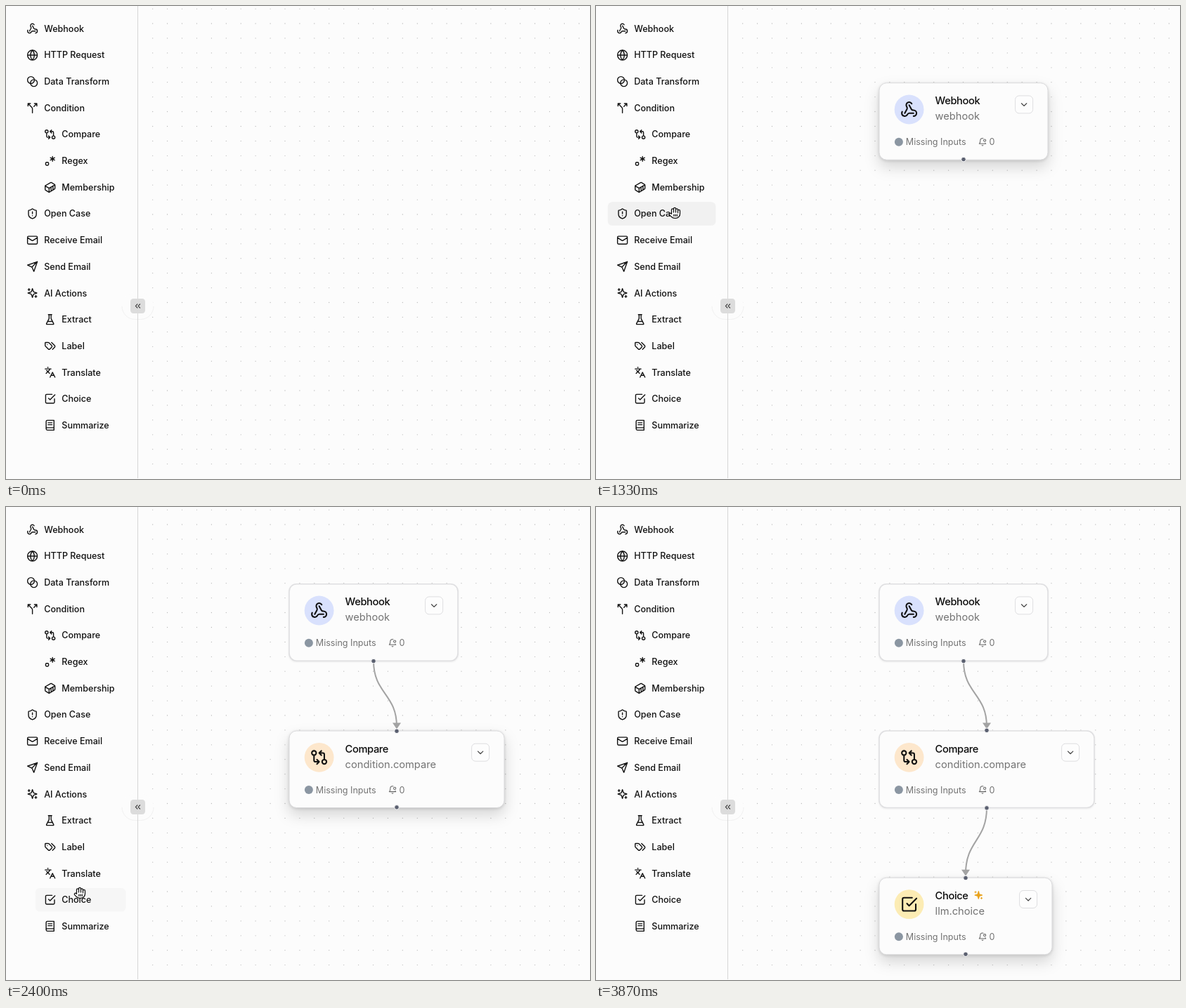
Recreate the animation shown at these times as an HTML page. Size 831 by 674 pixels, loop 3940 ms.

```html
<!DOCTYPE html>
<html lang="en">
<head>
<meta charset="utf-8">
<title>Workflow builder</title>
<style>
  html, body { margin: 0; width: 100%; height: 100%; overflow: hidden; background: #fcfcfc; }
  svg { display: block; }
  #stage { width: 831px; height: 674px; font-family: Inter, sans-serif; }
  .icon { fill: none; stroke: #111; stroke-width: 2; stroke-linecap: round; stroke-linejoin: round; }
  .row { font-size: 12.55px; font-weight: 500; fill: #111; }
  .title { font-size: 14.65px; font-weight: 500; letter-spacing: -.025em; fill: #0c0c0c; }
  .sub { font-size: 14.65px; fill: #737373; }
  .meta { font-size: 12.55px; fill: #737373; }
  .card { fill: #fcfcfc; stroke: #dfdfe1; stroke-width: 1.6; filter: drop-shadow(0 1px 1px rgba(0,0,0,.07)); }
  .active .card { stroke: #d9d9db; stroke-width: 1;
    filter: drop-shadow(0 1px 2px rgba(0,0,0,.14)) drop-shadow(0 10px 10px rgba(0,0,0,.15)); }
  .chip rect { filter: drop-shadow(0 2px 6px rgba(0,0,0,.22)); }
  .edge { fill: none; stroke: #a3a3a3; stroke-width: 2; }
</style>
</head>
<body>
<svg id="stage" viewBox="0 0 831 674"></svg>
<script>
const ICONS = {
  webhook: 'M18 16.98h-5.99c-1.1 0-1.95.94-2.48 1.9A4 4 0 0 1 2 17c.01-.7.2-1.4.57-2M6 17l3.13-5.78c.53-.97.1-2.18-.5-3.1a4 4 0 1 1 6.89-4.06M12 6l3.13 5.73C15.66 12.7 16.9 13 18 13a4 4 0 0 1 0 8',
  globe: 'M2 12a10 10 0 1 0 20 0a10 10 0 1 0-20 0zM12 2a14.5 14.5 0 0 0 0 20 14.5 14.5 0 0 0 0-20M2 12h20',
  blend: 'M2 9a7 7 0 1 0 14 0a7 7 0 1 0-14 0zM8 15a7 7 0 1 0 14 0a7 7 0 1 0-14 0z',
  split: 'M16 3h5v5M8 3H3v5M12 22v-8.3a4 4 0 0 0-1.172-2.872L3 3M15 9l6-6',
  compare: 'M2 6a3 3 0 1 0 6 0a3 3 0 1 0-6 0zM12 6h5a2 2 0 0 1 2 2v7M15 9l-3-3 3-3M16 18a3 3 0 1 0 6 0a3 3 0 1 0-6 0zM12 18H7a2 2 0 0 1-2-2V9M9 15l3 3-3 3',
  regex: 'M17 3v10M12.67 5.5l8.66 5M12.67 10.5l8.66-5M9 17a2 2 0 0 0-2-2H5a2 2 0 0 0-2 2v2a2 2 0 0 0 2 2h2a2 2 0 0 0 2-2v-2z',
  container: 'M22 7.7c0-.6-.4-1.2-.8-1.5l-6.3-3.9a1.72 1.72 0 0 0-1.7 0l-10.3 6c-.5.2-.9.8-.9 1.4v6.6c0 .5.4 1.2.8 1.5l6.3 3.9a1.72 1.72 0 0 0 1.7 0l10.3-6c.5-.3.9-1 .9-1.5ZM10 21.9V14L2.1 9.1M10 14l11.9-6.9M14 19.8v-8.1M18 17.5V9.4',
  shield: 'M20 13c0 5-3.5 7.5-7.66 8.95a1 1 0 0 1-.67-.01C7.5 20.5 4 18 4 13V6a1 1 0 0 1 1-1c2 0 4.5-1.2 6.24-2.72a1.17 1.17 0 0 1 1.52 0C14.51 3.81 17 5 19 5a1 1 0 0 1 1 1zM12 8v4M12 16h.01',
  mail: 'M4 4h16a2 2 0 0 1 2 2v12a2 2 0 0 1-2 2H4a2 2 0 0 1-2-2V6a2 2 0 0 1 2-2zM22 7l-8.97 5.7a1.94 1.94 0 0 1-2.06 0L2 7',
  send: 'M22 2l-7 20-4-9-9-4ZM22 2 11 13',
  sparkles: 'M12 3l-1.912 5.813a2 2 0 0 1-1.275 1.275L3 12l5.813 1.912a2 2 0 0 1 1.275 1.275L12 21l1.912-5.813a2 2 0 0 1 1.275-1.275L21 12l-5.813-1.912a2 2 0 0 1-1.275-1.275ZM5 3v4M19 17v4M3 5h4M17 19h4',
  flask: 'M10 2v7.527a2 2 0 0 1-.211.896L4.72 20.55a1 1 0 0 0 .9 1.45h12.76a1 1 0 0 0 .9-1.45l-5.069-10.127A2 2 0 0 1 14 9.527V2M8.5 2h7M7 16h10',
  tags: 'M15 5l6.3 6.3a2.4 2.4 0 0 1 0 3.4L17 19M9.586 5.586A2 2 0 0 0 8.172 5H3a1 1 0 0 0-1 1v5.172a2 2 0 0 0 .586 1.414L8.29 18.29a2.426 2.426 0 0 0 3.42 0l3.58-3.58a2.426 2.426 0 0 0 0-3.42zM6.5 9.5h.01',
  languages: 'M5 8l6 6M4 14l6-6 2-3M2 5h12M7 2h1M22 22l-5-10-5 10M14 18h6',
  check: 'M9 11l3 3L22 4M21 12v7a2 2 0 0 1-2 2H5a2 2 0 0 1-2-2V5a2 2 0 0 1 2-2h11',
  book: 'M4 19.5v-15A2.5 2.5 0 0 1 6.5 2H20v20H6.5a2.5 2.5 0 0 1 0-5H20M8 7h8M8 11h8',
  bell: 'M19.4 14.9C20.2 16.4 21 17 21 17H3s3-2 3-9c0-3.3 2.7-6 6-6 .7 0 1.3.1 1.9.3M10.3 21a1.94 1.94 0 0 0 3.4 0M15 8a3 3 0 1 0 6 0a3 3 0 1 0-6 0z',
  down: 'M6 9l6 6 6-6',
  left: 'M11 17l-5-5 5-5M18 17l-5-5 5-5'
};

// label, icon, indented
const ROWS = [
  ['Webhook', 'webhook'], ['HTTP Request', 'globe'], ['Data Transform', 'blend'], ['Condition', 'split'],
  ['Compare', 'compare', 1], ['Regex', 'regex', 1], ['Membership', 'container', 1],
  ['Open Case', 'shield'], ['Receive Email', 'mail'], ['Send Email', 'send'], ['AI Actions', 'sparkles'],
  ['Extract', 'flask', 1], ['Label', 'tags', 1], ['Translate', 'languages', 1],
  ['Choice', 'check', 1], ['Summarize', 'book', 1]
];
const PITCH = 37.67, TOP = 32.3;

// tick values: drag start, node shown, edge complete
const NODES = [
  { row: 0, sub: 'webhook', y: 109.7, w: 240, tint: '#d9e1fd', grab: [106, 40], drag: 7, show: 11 },
  { row: 4, sub: 'condition.compare', y: 319, w: 306, tint: '#fde7cc', grab: [117, 185], drag: 27, show: 30, link: 32 },
  { row: 14, sub: 'llm.choice', y: 528.3, w: 246, tint: '#fcecb4', grab: [105, 550], drag: 37, show: 40, link: 42 }
];
const NX = 403, NH = 109.5;

// cursor path: tick, x, y
const PATH = [
  [3, 518, 291], [4, 380, 190], [5, 170, 75], [6, 106, 40], [7, 200, 56], [8, 364, 82], [9, 412, 104], [10, 403, 110],
  [11, 408, 131], [14, 408, 131], [16, 320, 215], [18, 123, 304], [19, 112, 302], [21, 112, 288], [24, 115, 195],
  [25, 117, 185], [26, 117, 185], [27, 170, 205], [28, 310, 275], [29, 403, 319], [30, 523, 222], [31, 545, 280],
  [32, 556, 318], [33, 320, 425], [34, 107, 524], [35, 105, 539], [36, 105, 550], [37, 150, 548], [38, 300, 538],
  [39, 403, 528], [40, 556, 432], [41, 540, 485], [42, 526, 526], [43, 440, 498], [45, 289, 432], [48, 120, 365], [50, 119, 360]
];
const TICK = 1000 / 15, LOOP = 3940;

const icon = (name, cx, cy, size, extra = '') =>
  `<path class="icon" d="${ICONS[name]}" transform="translate(${cx - size / 2} ${cy - size / 2}) scale(${size / 24})" ${extra}/>`;
const text = (cls, x, y, s) => `<text class="${cls}" x="${x}" y="${y}">${s}</text>`;
const group = (id, body, extra = '') => `<g id="${id}" ${extra}>${body}</g>`;
const rowY = i => TOP + PITCH * i;

function rowBack(i, attrs) {
  const x = ROWS[i][2] ? 41.8 : 16.7;
  return `<rect x="${x}" y="${rowY(i) - 16.7}" width="${170.5 - x}" height="33.5" rx="6.3" ${attrs}/>`;
}

function rowBody(i) {
  const [label, name, sub] = ROWS[i], x = sub ? 25.1 : 0;
  return icon(name, 37.6 + x, rowY(i), 16.74) + text('row', 54.2 + x, rowY(i) + 4.5, label);
}

function nodeBody({ row, sub, y, w, tint }) {
  const [label, name] = ROWS[row], bx = NX + w - 46.4;
  return `<rect class="card" x="${NX}" y="${y}" width="${w}" height="${NH}" rx="10.5"/>
    <circle cx="445.6" cy="${y + 37.8}" r="20.9" fill="${tint}"/>` +
    icon(name, 445.6, y + 37.8, 25.1) +
    text('title', 482.6, y + 30.6, label) + text('sub', 482.6, y + 52.6, sub) +
    (row === 14 ? icon('sparkles', 544.3, y + 24.8, 14.6, 'style="stroke:#e9a21b;fill:#e9a21b;stroke-width:1.6"') : '') +
    `<rect x="${bx}" y="${y + 18.2}" width="25" height="25" rx="5.5" fill="#fdfdfd" stroke="#dedee0"/>` +
    icon('down', bx + 12.5, y + 30.9, 14.6, 'style="stroke:#444"') +
    `<circle cx="430.9" cy="${y + 84}" r="6" fill="#8b96a2"/>` +
    text('meta', 440.8, y + 88.5, 'Missing Inputs') +
    icon('bell', 550, y + 84, 12.55, 'style="stroke:#666"') + text('meta', 559.6, y + 88.5, '0');
}

const dot = (id, x) => `<circle id="${id}" cx="${x}" r="3.3" fill="#5b6070" stroke="#fcfcfc"/>`;

function curve(x1, y1, x2, y2) {
  const m = (y1 + y2) / 2;
  return `M${x1} ${y1}C${x1} ${m} ${x2} ${m} ${x2} ${y2}`;
}

let grid = '';
for (let x = 208.7; x < 831; x += 20.92)
  for (let y = 4.1; y < 672; y += 20.92) grid += `M${x.toFixed(1)} ${y.toFixed(1)}h0`;

const mid = n => NX + n.w / 2;
const stage = document.getElementById('stage');
stage.innerHTML =
  `<path d="${grid}" stroke="#b9b9b9" stroke-width="1.3" stroke-linecap="round"/>
  <path d="M187.5 0V673" stroke="#d6d6d6"/>
  <rect x="165" y="408" width="45" height="38.5" rx="19" fill="#fcfcfc"/>
  <path d="M165 428a18.5 18.5 0 0 0 18.5 18.5h8a18.5 18.5 0 0 0 18.5-18.5" fill="none" stroke="#f1f1f1"/>
  <path d="M187.5 408V447" stroke="#d6d6d6"/>
  <rect x="177" y="417" width="21" height="21" rx="4.2" fill="#dcdcdc"/>` +
  icon('left', 187.5, 427.5, 12.6, 'style="stroke:#222"') +
  rowBack(0, 'id="hover" fill="#f1f1f1"') +
  ROWS.map((_, i) => rowBody(i)).join('') +
  NODES.map((n, i) => group('node' + i, nodeBody(n))).join('') +
  NODES.map((n, i) => i ? `<path id="edge${i}" class="edge"/>
    <path id="tip${i}" d="M${mid(n) - 6} ${n.y - 11.5}h12l-6 9z" fill="#a3a3a3"/>` : '').join('') +
  NODES.map((n, i) => group('dots' + i, (i ? dot('in' + i, mid(n)) : '') + dot('out' + i, mid(n)))).join('') +
  NODES.map((n, i) => group('chip' + i, rowBack(n.row, 'fill="#f3f3f3"') + rowBody(n.row), 'class="chip"')).join('') +
  group('arrow', '<path d="M0 0V15.6L3.7 12.2 6.2 18 9 16.8 6.5 11.1H11.3Z" stroke="#fff" stroke-width="1.2"/>') +
  group('hand', `<g transform="translate(-9 -9.2) scale(.75)" fill="#fff" stroke="#111" stroke-width="1.7" stroke-linecap="round" stroke-linejoin="round">
    <path d="M6 14V6a2 2 0 0 1 4 0V4a2 2 0 0 1 4 0v2a2 2 0 0 1 4 0v2a2 2 0 0 1 4 0v6a8 8 0 0 1-8 8h-2c-2.8 0-4.5-.9-6-2.3l-3.6-3.6a2 2 0 0 1 2.8-2.9z"/>
    <path d="M10 6v5M14 6v5M18 8v4M10.5 15v3M13.5 15v3M16.5 15v3"/></g>`);

const $ = id => document.getElementById(id);
const show = (id, on) => { $(id).style.display = on ? '' : 'none'; };
const move = (id, x, y) => $(id).setAttribute('transform', `translate(${x} ${y})`);
const set = (id, attrs) => { for (const k in attrs) $(id).setAttribute(k, attrs[k]); };

function cursorAt(k) {
  const i = PATH.findIndex(p => p[0] >= k);
  if (k < PATH[0][0] || i < 0 || k >= 50) return null;
  const b = PATH[i], a = PATH[Math.max(0, i - 1)];
  const f = b[0] === a[0] ? 1 : (k - a[0]) / (b[0] - a[0]);
  return [a[1] + (b[1] - a[1]) * f, a[2] + (b[2] - a[2]) * f];
}

function rowAt(c) {
  if (!c || c[0] < 17 || c[0] > 170) return -1;
  const i = Math.round((c[1] - TOP) / PITCH);
  return ROWS[i] ? i : -1;
}

function draw(k) {
  const c = cursorAt(k);
  const held = NODES.find(n => k >= n.drag && k < n.show);
  const linking = NODES.some(n => n.link && k >= n.show && k < n.link);
  const last = NODES.filter(n => k >= n.show).pop();

  const row = held ? held.row : rowAt(c);
  show('hover', row >= 0);
  if (row >= 0) {
    const x = ROWS[row][2] ? 41.8 : 16.7;
    const fresh = !held && rowAt(cursorAt(k - 1)) !== row;
    set('hover', { x, y: rowY(row) - 16.7, width: 170.5 - x, opacity: fresh ? .5 : 1 });
  }

  NODES.forEach((n, i) => {
    const on = k >= n.show, active = n === last, inset = active ? 1 : 0;
    show('node' + i, on);
    show('dots' + i, on);
    $('node' + i).setAttribute('class', active ? 'active' : '');
    set('out' + i, { cy: n.y + NH + .4 - inset });
    show('chip' + i, n === held);
    if (n === held) move('chip' + i, c[0] - n.grab[0], c[1] - n.grab[1]);
    if (!i) return;
    set('in' + i, { cy: n.y - .7 + inset });
    const from = NODES[i - 1], linked = k >= n.link, pulling = k > n.show && !linked;
    show('edge' + i, linked || pulling);
    show('tip' + i, linked);
    const [x, y] = pulling ? c : [mid(n), n.y - 6];
    set('edge' + i, { d: curve(mid(from), from.y + NH, x, y) });
  });

  const arrow = held || linking;
  show('arrow', c && arrow);
  show('hand', c && !arrow);
  if (c) move(arrow ? 'arrow' : 'hand', c[0], c[1]);
}

function frame() {
  draw(Math.floor((performance.now() % LOOP + 4) / TICK));
  requestAnimationFrame(frame);
}
frame();
</script>
</body>
</html>
```
